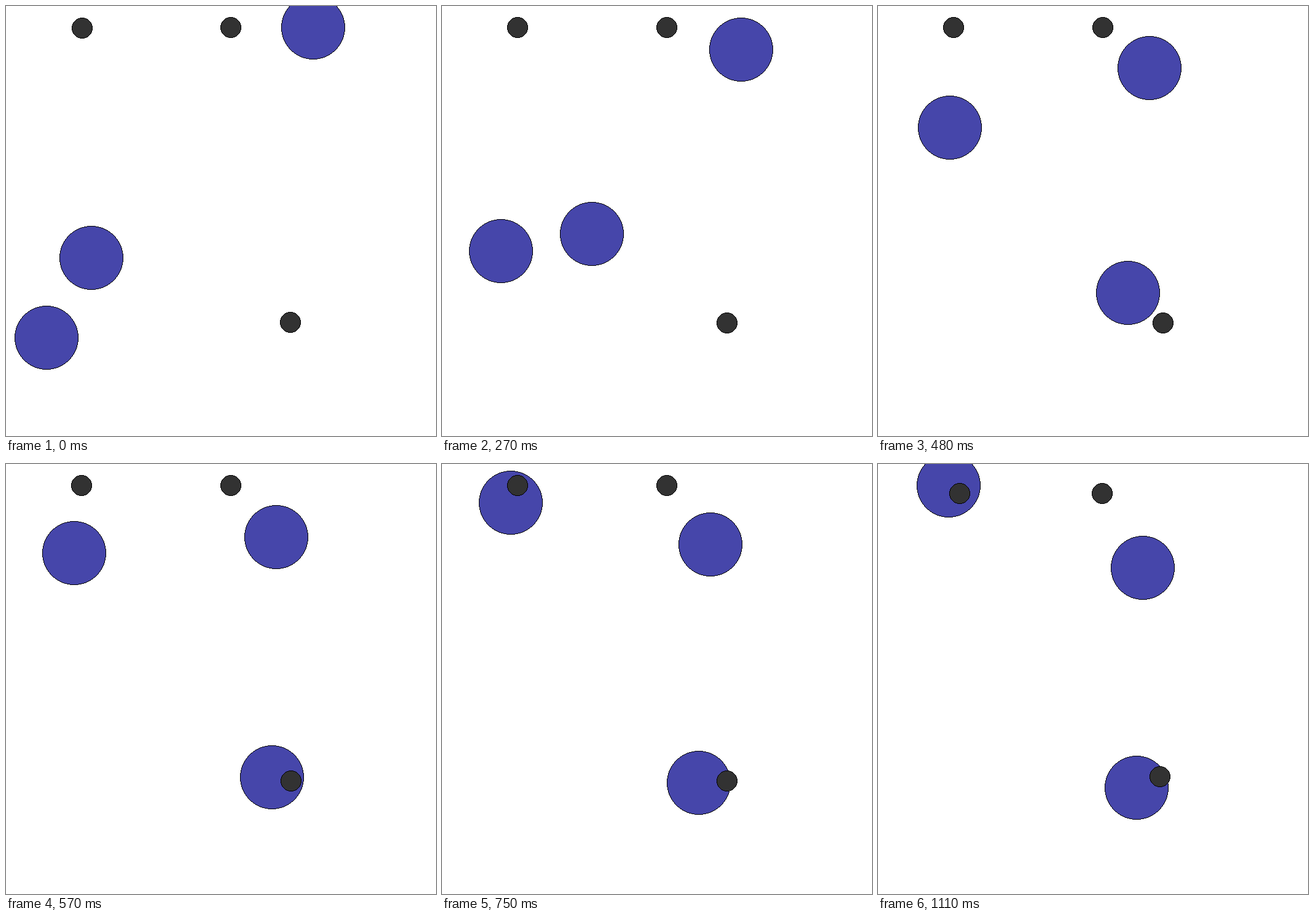
Write an HTML page with a canvas that moves like this. It is 700 px wide and 700 px high and loops after 1.17 s.

```html
<!DOCTYPE html>
<html lang="en">
<head>
<meta charset="utf-8">
<title>Moving discs</title>
<style>
  html, body { margin: 0; width: 100%; height: 100%; overflow: hidden; background: #fff; }
  canvas { display: block; }
</style>
</head>
<body>
<canvas id="stage" width="700" height="700"></canvas>
<script>
const LOOP = 1170, TOP = 35, CENTER = 350, KEY_STEPS = 4;
const ctx = stage.getContext("2d");

// Evenly timed waypoints of each large disc
const paths = [
  [[139, 410], [210, 366], [360, 418], [433, 510], [418, 519], [413, 520], [421, 527]],
  [[66, 540], [88, 439], [119, 263], [111, 145], [112, 63], [108, 35], [115, 35]],
  [[500, 35], [497, 67], [450, 82], [440, 119], [437, 131], [435, 156], [431, 169]]
];

// Small dots at their widest spread
const dots = [[123.1, 35.2], [366, 34.5], [463.6, 515.9]];

// Smooth curve through the waypoints, at rest at both ends
function along(path, k) {
  const last = path.length - 1;
  const i = Math.min(Math.floor(k), last - 1), u = k - i, v = 1 - u;
  const key = n => path[last - Math.abs(last - Math.abs(n))];
  const [p, a, b, q] = [i - 1, i, i + 1, i + 2].map(key);
  return [0, 1].map(c =>
    a[c] * v * v * (1 + 2 * u) + b[c] * u * u * (1 + 2 * v)
    + u * v * ((b[c] - p[c]) * v - (q[c] - a[c]) * u) / 2);
}

// Unsmoothed disc with a one-pixel black edge, built from one mirrored octant
function disc(x, y, r, fill) {
  x = Math.round(x);
  y = Math.round(y);
  const arc = [];
  for (let a = 0.5, b = r; a <= b; a++) {
    b = Math.round(Math.sqrt(r * r - a * a) - 0.5) + 0.5;
    arc.push([a, b], [a, -b], [b, a], [b, -a]);
  }
  ctx.fillStyle = fill;
  for (const [w, h] of arc) ctx.fillRect(x - w - 0.5, y + h - 0.5, 2 * w + 1, 1);
  ctx.fillStyle = "#000";
  for (const [w, h] of arc) {
    ctx.fillRect(x - w - 0.5, y + h - 0.5, 1, 1);
    ctx.fillRect(x + w - 0.5, y + h - 0.5, 1, 1);
  }
}

function draw(now) {
  const t = now % LOOP;
  // Steps last 30 and 60 ms in turn; the first two look alike
  const step = Math.max(1, 2 * Math.floor(t / 90) + (t % 90 >= 30));

  ctx.clearRect(0, 0, 700, 700);
  for (const path of paths) {
    const [x, y] = along(path, (step - 1) / KEY_STEPS);
    disc(x, Math.max(TOP, y), 51.5, "#4646aa");
  }

  // The ring of dots opens fully, rests, then starts to close again
  const closing = 0.042 * (Math.max(0, 3.12 - step, step - 17) / 8) ** 2;
  const pull = p => p + (CENTER - p) * closing;
  for (const [x, y] of dots) disc(pull(x), pull(y), 16.5, "#323232");
}

const start = performance.now();
function tick() {
  draw(performance.now() - start);
  requestAnimationFrame(tick);
}
tick();
</script>
</body>
</html>
```
